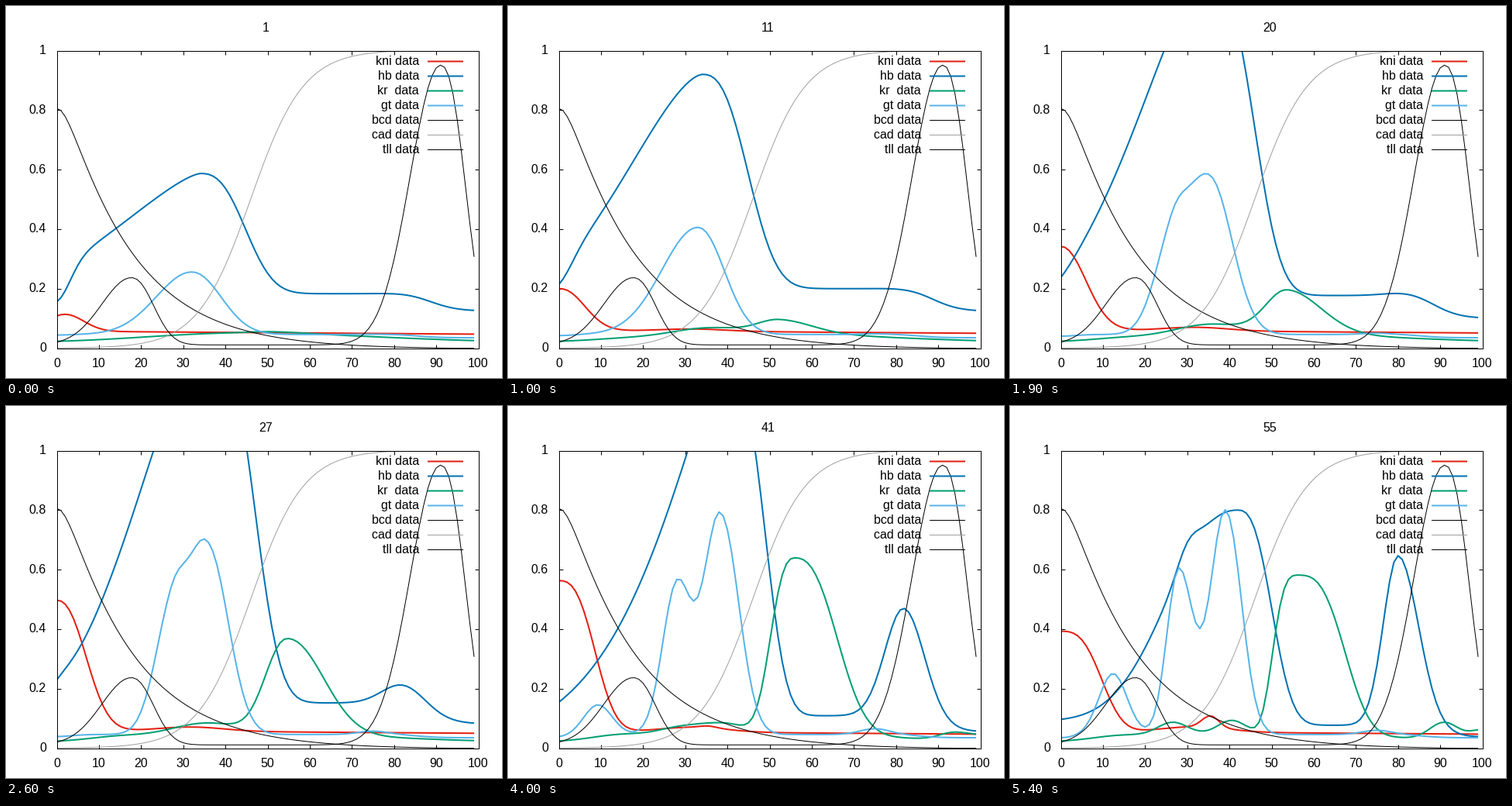
A matplotlib script for the animation above (5.5 s loop, 640 by 480 pixels).

```python
import numpy as np
import matplotlib.pyplot as plt
from matplotlib.animation import FuncAnimation
from matplotlib.lines import Line2D

W, H, DPI = 640, 480, 100
PX = 72 / DPI                      # one pixel in points
LEFT, RIGHT, TOP, BOTTOM = 65.5, 609.5, 57.5, 441.5
STEPS = 55
STAGES = [0, 10, 19, 26, 34, 40, 54]

plt.rcParams["font.family"] = "Liberation Sans"
plt.rcParams["font.size"] = 16 * PX

x = np.arange(100.0)
steps = np.arange(STEPS)


def track(*values):
    """Smooth parameter over all steps, as a column to combine with x."""
    n = len(values)
    t = np.array(STAGES if n == len(STAGES) else np.linspace(0, STEPS - 1, n), float)
    v = np.array(values, float)
    d = np.diff(v) / np.diff(t)
    prod = d[:-1] * d[1:]
    inner = np.where(prod > 0, 2 * prod / np.where(prod > 0, d[:-1] + d[1:], 1), 0)
    m = np.concatenate([d[:1], inner, d[-1:]])
    i = np.clip(np.searchsorted(t, steps, side="right") - 1, 0, n - 2)
    h = t[i + 1] - t[i]
    s = (steps - t[i]) / h
    y = ((1 + 2 * s) * (1 - s) ** 2 * v[i] + s * (1 - s) ** 2 * h * m[i]
         + s * s * (3 - 2 * s) * v[i + 1] + s * s * (s - 1) * h * m[i + 1])
    return y[:, None]


def bump(c, left, right=None, p=2, q=None):
    """Unit peak at c with its own width and power on each side."""
    right = left if right is None else right
    q = p if q is None else q
    d = np.abs(x - c)
    return np.exp(-np.where(x < c, (d / left) ** p, (d / right) ** q))


def logistic(c, w):
    return 1 / (1 + np.exp(-(x - c) / w))


def make_kni():
    base = track(.057, .060, .061, .060, .058, .057, .057) - .0001 * x
    front = bump(2 * .8 ** steps[:, None],
                 track(6.2, 7.9, 8.1, 8.85, 9.75, 10.15, 11.2),
                 p=track(2, 2.2, 2.1, 2.35, 2.76, 2.8, 3))
    return (base
            + track(.057, .140, .281, .437, .516, .506, .336) * front
            + track(0, .012, .016, .018) * bump(32, 11)
            + track(0, 0, 0, 0, 0, .006, .039) * bump(35.5, 2.8))


def make_hb():
    peak = track(.587, .92, 1.25, 1.38, 1.5, 1.3, .80)
    c = track(34, 34, 34.5, 36, 37.5, 38.5, 42)
    low = track(0, 0, 0, 0, 0, 0, .09)
    floor = (track(.183, .200, .177, .152, .127, .109, .077)
             * (1 - track(.32, .47, .52) * logistic(89, 3.2)))
    hill = bump(c,
                track(40, 29.8, 25.5, 25, 22, 21.7, 21.5),
                track(12.9, 13.1, 13.4, 12.85, 12, 11.9, 9.65),
                track(1.4, 1.6, 1.6, 1.74, 1.35, 1.32, 2.3),
                track(2.65, 2.65, 2.9, 2.9, 3, 3.2, 2.7))
    base = np.where(x < c, low, floor)
    rear = bump(track(82, 82, 82, 80), track(7, 7, 7, 6.8, 7, 6.25, 4.9), 6.8)
    return (base + (peak - base) * hill
            + track(-.109, -.054, -.01, .02, 0, 0, 0) * bump(0, 4.5)
            + track(0, 0, 0, 0, 0, 0, .055) * bump(30, 3.5)
            + track(.003, .003, .012, .067, .222, .366, .572) * rear)


def make_kr():
    main = bump(track(50.7, 53.5, 56, 56.6), 7.1,
                track(10.5, 11.3, 12, 12.6),
                track(2, 2, 2.6, 3.5), track(2, 2, 2.4, 2.9))
    late = track(0, 0, 0, 0, .005, .025, .058)
    return (.018 + .033 * bump(44, 32, 45)
            + track(.005, .045, .145, .318, .530, .590, .533) * main
            + track(0, .02, .032, .036, .035, .034, 0) * bump(35, 11)
            + track(0, 0, 0, 0, 0, .006, .043) * (bump(26.5, 5) + bump(40.5, 4.5))
            + track(0, .004, .014, .012) * bump(14, 9)
            + late * (bump(track(94, 94, 94, 91), 4.8) + .6 * bump(100, 4)))


def make_gt():
    base = .046 - .011 * logistic(86, 2.5) - track(.002, .007, .011) * bump(0, 5)
    main = bump(track(32, 33, 35, 35.5, 37, 38.2, 39),
                track(11.8, 12, 8, 6.5, 5.5, 5.4, 4.9),
                track(9.6, 7, 5.3), q=2.1)
    side = bump(track(25, 26.2, 28, 28), track(6.2, 6, 5, 4), 4.8)
    return (base
            + track(.210, .360, .530, .635, .705, .742, .752) * main
            + track(0, 0, .245, .375, .478, .500, .556) * side
            + track(0, 0, 0, 0, .040, .100, .205) * bump(track(9, 9, 9, 12.4), 4.7)
            + track(.001, .004, .020, .014) * bump(75, 5))


bcd = np.maximum(.993 * np.exp(-np.hypot(x, 3.33) / 16.2) - .003, 0)
cad = 1.002 * logistic(46, 6.3)
tll = (.011 + .226 * bump(17.7, 9.9, 7, 2, 2.2)
       + .94 * bump(91, 10.1, 7.53, 2, 2.4))

SERIES = [
    ("kni data", "#e51e10", 2, make_kni()),
    ("hb data", "#0072b2", 2, make_hb()),
    ("kr  data", "#009e73", 2, make_kr()),
    ("gt data", "#56b4e9", 2, make_gt()),
    ("bcd data", "black", 1, bcd),
    ("cad data", "#a0a0a0", 1, cad),
    ("tll data", "black", 1, tll),
]

fig = plt.figure(figsize=(W / DPI, H / DPI), dpi=DPI, facecolor="white")
ax = fig.add_axes([LEFT / W, 1 - BOTTOM / H, (RIGHT - LEFT) / W, (BOTTOM - TOP) / H])
ax.set(xlim=(0, 100), ylim=(0, 1),
       xticks=np.arange(0, 101, 10), yticks=np.linspace(0, 1, 6))
ax.tick_params(direction="in", length=5 * PX, width=PX, top=True, right=True,
               labelbottom=False, labelleft=False)
for spine in ax.spines.values():
    spine.set_linewidth(PX)


def label(px, py, text, ha):
    """Text with its baseline at pixel (px, py) from the top left."""
    return fig.text(px / W, 1 - py / H, text, ha=ha, va="baseline")


for v in range(0, 101, 10):
    label(LEFT + (RIGHT - LEFT) * v / 100, 465.5, str(v), "center")
for v in range(6):
    label(52, BOTTOM - (BOTTOM - TOP) * v / 5 + 4.5, f"{v / 5:g}", "right")

moving = []
for row, (name, color, width, data) in enumerate(SERIES):
    y = 71 + 19 * row
    style = dict(color=color, lw=width * PX, solid_capstyle="butt")
    label(533, y + 5, name, "right")
    fig.add_artist(Line2D([544 / W, 590 / W], [1 - (y + 0.5) / H] * 2,
                          snap=False, **style))
    line, = ax.plot(x, data[0] if data.ndim > 1 else data, **style)
    if data.ndim > 1:
        moving.append((line, data))

title = label(335.5, 33, "1", "center")


def update(step):
    title.set_text(str(step + 1))
    for line, data in moving:
        line.set_ydata(data[step])
    return [title] + [line for line, _ in moving]


anim = FuncAnimation(fig, update, frames=STEPS, interval=100, repeat=True)
plt.show()
```
